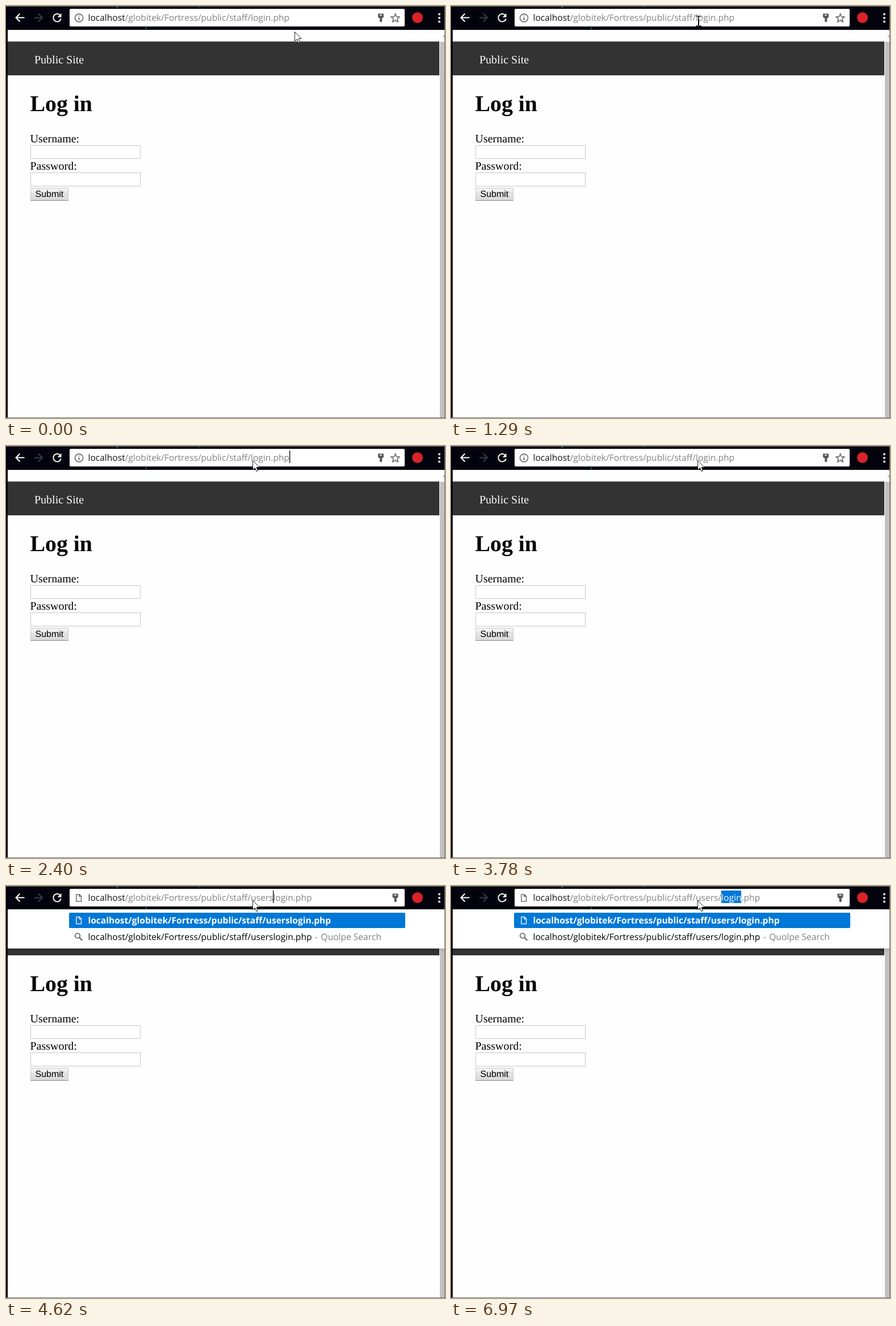
Write an HTML page that moves like this. It is 773 by 725 pixels and loops after 8000 ms.

```html
<!DOCTYPE html>
<html lang="en">
<head>
<meta charset="utf-8">
<title>Login page</title>
<style>
html, body { margin: 0; width: 100%; height: 100%; overflow: hidden; background: #fff; }
svg { display: block; width: 773px; height: 725px; }
text { white-space: pre; text-rendering: geometricPrecision; }
.ui { font: 15.55px "Open Sans", "Noto Sans", sans-serif; font-kerning: none; font-variant-ligatures: none; }
.page { font: 20px "Liberation Serif", "Times New Roman", serif; }
.line { fill: none; stroke-width: 2; }
</style>
</head>
<body>
<svg viewBox="0 0 773 725" xmlns="http://www.w3.org/2000/svg">
  <defs>
    <linearGradient id="face" x2="0" y2="1">
      <stop offset="0" stop-color="#f4f4f4"/><stop offset=".3" stop-color="#f0f0f0"/>
      <stop offset=".3" stop-color="#e6e6e6"/><stop offset="1" stop-color="#d9d9d9"/>
    </linearGradient>
    <linearGradient id="shade" x2="0" y2="1">
      <stop offset="0" stop-opacity=".12"/><stop offset="1" stop-opacity="0"/>
    </linearGradient>
    <path id="sheet" d="M-4.2-6.2H1.2L4.5-2.9V6.2H-4.2ZM.9-6V-2.6H4.3" fill="none" stroke-width="1.3"/>
  </defs>

  <rect width="773" height="725" fill="#fefefe"/>

  <g class="page" fill="#000">
    <rect x="3" y="62.5" width="760" height="59.5" fill="#333"/>
    <text x="50" y="101" fill="#fff">Public Site</text>
    <text x="42.5" y="185" style="font-size:39.8px;font-weight:bold">Log in</text>
    <text x="42.5" y="240">Username:</text>
    <text x="42.5" y="288">Password:</text>
    <g fill="#fff" stroke="#c6c6c6">
      <rect x="43.5" y="245.5" width="193" height="23"/>
      <rect x="43.5" y="293.5" width="193" height="23.5"/>
    </g>
    <rect x="43.5" y="320.5" width="66" height="22" fill="url(#face)" stroke="#c9c9c9"/>
    <path d="M43 342.300H110" stroke="#a4a4a4" stroke-width="1.5"/>
    <text x="51.5" y="336" style="font:16px 'Liberation Sans',Arial,sans-serif">Submit</text>
  </g>

  <rect x="764" y="63" width="8" height="662" fill="#c1c1c1"/>
  <path d="M768 54.500L772 51V54.500Z" fill="#aaa"/>

  <rect width="773" height="42" fill="#03030d"/>
  <rect width="3" height="725" fill="#03030d"/>
  <g fill="#1d6f7c">
    <circle cx="196" cy="2" r="1.5"/><circle cx="247" cy="39" r="1.5"/><circle cx="340" cy="1.5" r="1"/>
  </g>

  <g class="line" stroke="#fff">
    <path d="M32.500 20.500H17.500M24.500 13.500L17.500 20.500L24.500 27.500"/>
    <path d="M50 20.500H64M57 13.500L64 20.500L57 27.500" stroke="#3c3c45"/>
    <path d="M95.300 16A6.900 6.900 0 1 0 96.900 22.300"/>
  </g>
  <path d="M97.500 12.800V19.700H90.600Z" fill="#fff"/>
  <rect x="112" y="5" width="590" height="31" rx="2" fill="#fff"/>
  <circle cx="724.5" cy="20.5" r="9.5" fill="#d8232a"/>
  <g fill="#fff">
    <circle cx="763" cy="14.5" r="1.9"/><circle cx="763" cy="21" r="1.9"/><circle cx="763" cy="27.5" r="1.9"/>
  </g>

  <g id="idleIcons" fill="none" stroke="#5a5a5a" stroke-width="1.5">
    <circle cx="128.5" cy="21" r="7"/>
    <path d="M128.500 20V25M128.500 16.700V18.300" stroke-width="1.7"/>
    <path d="M685.500 13.800L687.600 18.700L692.900 19.200L688.900 22.700L690.100 27.900L685.500 25.100L680.900 27.900L682.100 22.700L678.100 19.200L683.400 18.700Z"/>
  </g>
  <use id="editIcon" href="#sheet" x="128" y="21" stroke="#5a5a5a"/>
  <g id="key" fill="#5a5a5a">
    <path d="M-5-7H5V-1L2.200 1.500V7.500H-1.800V1.500L-5-1Z"/>
    <rect x="-2" y="-5.2" width="4" height="1.5" fill="#fff"/>
  </g>

  <rect id="selection" y="8" height="22" fill="#0078d7"/>
  <text id="address" class="ui" x="144.5" y="26"></text>
  <rect id="caret" y="8" width="1.3" height="22"/>

  <g id="menu">
    <rect x="3" y="110" width="769" height="7" fill="url(#shade)"/>
    <rect x="3" y="41" width="769" height="69" fill="#fff"/>
    <rect x="111" y="47" width="592" height="27" rx="2" fill="#0078d7"/>
    <use href="#sheet" x="128" y="60.5" stroke="#fff"/>
    <g class="line" stroke="#5a5a5a"><circle cx="126" cy="87.5" r="4.3" stroke-width="1.6"/><path d="M129.200 90.700L134.300 95.800"/></g>
    <text id="best" class="ui" x="144.5" y="66" fill="#fff" style="font-weight:700"></text>
    <text class="ui" x="144.5" y="95"><tspan id="query"></tspan><tspan dx="1.5" fill="#808080"> - </tspan><tspan dx="1.5" fill="#808080">Quolpe Search</tspan></text>
  </g>

  <path d="M0 .5H773M772.500 0V725M0 724.500H773" stroke="#777" fill="none"/>

  <path id="beam" d="M0 0H4L5 1L6 0H10V1.600H6V17.400H10V19H6L5 18L4 19H0V17.400H4V1.600H0Z" fill="#fff" style="mix-blend-mode:difference"/>
  <path id="arrow" d="M0 0V16.400L3.800 12.900L6.500 19.200L9 18.100L6.400 12H11.700Z" fill="#fff" stroke="#222"/>
</svg>

<script>
const LOOP = 8000;
const HOST = "localhost";
const FOLDER = HOST + "/globitek/Fortress/public/staff/";
const FILE = "login.php";
const LEFT = 144.5;

// Each track holds [start time, ...values]; a value stays until the next start.
const typedTrack = [[0, 0], [4060, 2], [4320, 4], [4620, 5], [4920, 6]];
const caretTrack = [[0, -1], [2400, 50], [2530, 49], [3090, 45], [3240, 41], [3780, -1],
  [4060, 43], [4320, 45], [4620, 46], [4920, 47], [5450, -1], [6000, 47], [6280, -1]];
const selectTrack = [[0, 0, 0], [1700, 0, 50], [2400, 0, 0], [6280, 47, 48], [6410, 47, 49],
  [6540, 47, 50], [6820, 47, 51], [6970, 47, 52]];
const pointerTrack = [[0, "arrow", 508.5, 45.5], [130, "beam", 505, 18], [300, "beam", 505, 17],
  [580, "beam", 499, 17], [720, "beam", 442, 24], [870, "beam", 435, 24], [1000, "beam", 431, 23],
  [1150, "beam", 431, 20], [1290, "beam", 431, 17], [2400, "arrow", 434.5, 25.5]];

const el = id => document.getElementById(id);
const show = (id, on) => el(id).setAttribute("display", on ? "inline" : "none");
const move = (id, x, y) => el(id).setAttribute("transform", `translate(${x} ${y})`);
const at = (track, t) => track.findLast(step => step[0] <= t).slice(1);

function setAddress(url, from, to) {
  const cuts = [...new Set([0, HOST.length, from, to, url.length])].sort((a, b) => a - b);
  const spans = cuts.slice(1).map((end, i) => {
    const start = cuts[i];
    const span = document.createElementNS("http://www.w3.org/2000/svg", "tspan");
    const selected = start >= from && end <= to;
    span.setAttribute("fill", selected ? "#fff" : start < HOST.length ? "#111" : "#808080");
    span.textContent = url.slice(start, end);
    return span;
  });
  el("address").replaceChildren(...spans);
}

const charX = n => Math.round(LEFT + (n > 0 ? el("address").getSubStringLength(0, n) : 0));

let lastState = "";
function render(t) {
  const [typed] = at(typedTrack, t);
  const [caret] = at(caretTrack, t);
  const [from, to] = at(selectTrack, t);
  const [pointer, x, y] = at(pointerTrack, t);
  const state = [typed, caret, from, to, pointer, x, y].join();
  if (state === lastState) return;
  lastState = state;

  const url = FOLDER + "users/".slice(0, typed) + FILE;
  const editing = typed > 0;
  setAddress(url, from, to);
  el("best").textContent = el("query").textContent = url;

  show("menu", editing);
  show("editIcon", editing);
  show("idleIcons", !editing);
  move("key", editing ? 685.5 : 660, 20.5);

  show("caret", caret >= 0);
  el("caret").setAttribute("x", charX(caret));
  el("selection").setAttribute("x", charX(from));
  el("selection").setAttribute("width", charX(to) - charX(from));

  show("beam", pointer === "beam");
  show("arrow", pointer === "arrow");
  move(pointer, x, y);
}

const begin = performance.now();
function tick() {
  render((performance.now() - begin) % LOOP);
  requestAnimationFrame(tick);
}
tick();
</script>
</body>
</html>
```
